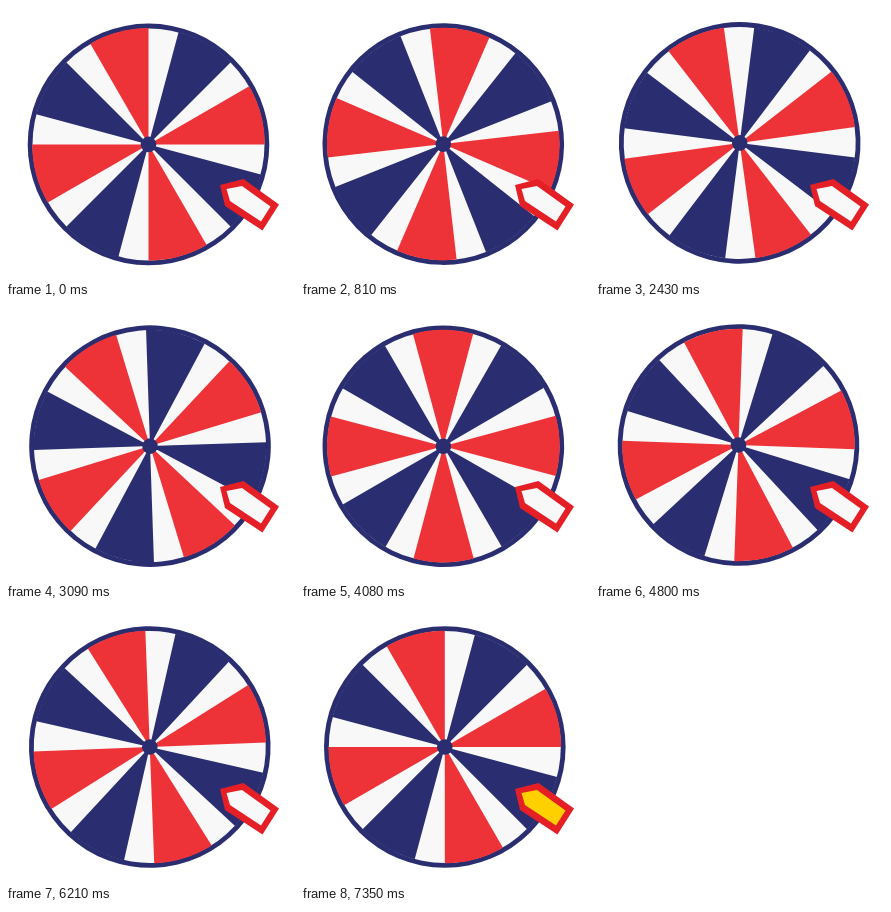
Write an HTML page that moves like this. It is 289 px wide and 274 px high and loops after 8580 ms.

```html
<!DOCTYPE html>
<html lang="en">
<head>
<meta charset="utf-8">
<title>Spinning wheel</title>
<style>
  html, body { margin: 0; width: 100%; height: 100%; overflow: hidden; background: #fff; }
  svg { display: block; width: 100%; height: 100%; }
</style>
</head>
<body>
<svg viewBox="0 0 289 274">
  <g id="wheel">
    <circle r="120.8" fill="#2a2e70"/>
    <circle r="116" fill="#f8f8f8"/>
    <g id="sectors"></g>
    <circle r="7.8" fill="#2a2e70"/>
  </g>
  <path d="M214 179L237.5 173L273 198.500L256.500 224.500L219 200Z" fill="#e51f26"/>
  <path id="lamp" d="M220.500 183L236 180L264.500 200.500L255 215.500L224 195Z"/>
</svg>
<script>
const LOOP = 8580, STEP = 30, SPIN = 6450, TURN = 540;
const LIT_FROM = 7290, LIT_TO = 7350;
const PIVOT = { x: 143.15, y: 137.7 };
const OFFSET = { x: -0.65, y: 0.7 }; // the disc sits slightly off its axis
const OFF = [248, 248, 248], ON = [255, 208, 0];

const wheel = document.getElementById('wheel');
const sectors = document.getElementById('sectors');
const lamp = document.getElementById('lamp');

function addSector(start, color) {
  const r = 116.3;
  const point = deg => {
    const a = deg * Math.PI / 180;
    return `${r * Math.sin(a)} ${-r * Math.cos(a)}`;
  };
  const path = document.createElementNS('http://www.w3.org/2000/svg', 'path');
  path.setAttribute('d', `M0 0L${point(start)}A${r} ${r} 0 0 1 ${point(start + 30)}Z`);
  path.setAttribute('fill', color);
  sectors.append(path);
}

for (let quarter = 0; quarter < 360; quarter += 90) {
  addSector(quarter - 30, '#ee3338');
  addSector(quarter + 15, '#2a2e70');
}

const clamp = v => Math.min(1, Math.max(0, v));
const smooth = u => u * u * (3 - 2 * u);

function draw(time) {
  const t = Math.floor((time % LOOP) / STEP) * STEP;
  const angle = TURN * smooth(clamp(t / SPIN));
  wheel.setAttribute('transform',
    `translate(${PIVOT.x} ${PIVOT.y}) rotate(${angle}) translate(${OFFSET.x} ${OFFSET.y})`);

  const lit = clamp((t - LIT_FROM) / (LIT_TO - LIT_FROM));
  const rgb = OFF.map((v, i) => Math.round(v + (ON[i] - v) * lit));
  lamp.setAttribute('fill', `rgb(${rgb})`);
}

let origin;
function tick(now) {
  origin ??= now;
  draw(Math.max(0, now - origin));
  requestAnimationFrame(tick);
}
draw(0);
requestAnimationFrame(tick);
</script>
</body>
</html>
```
